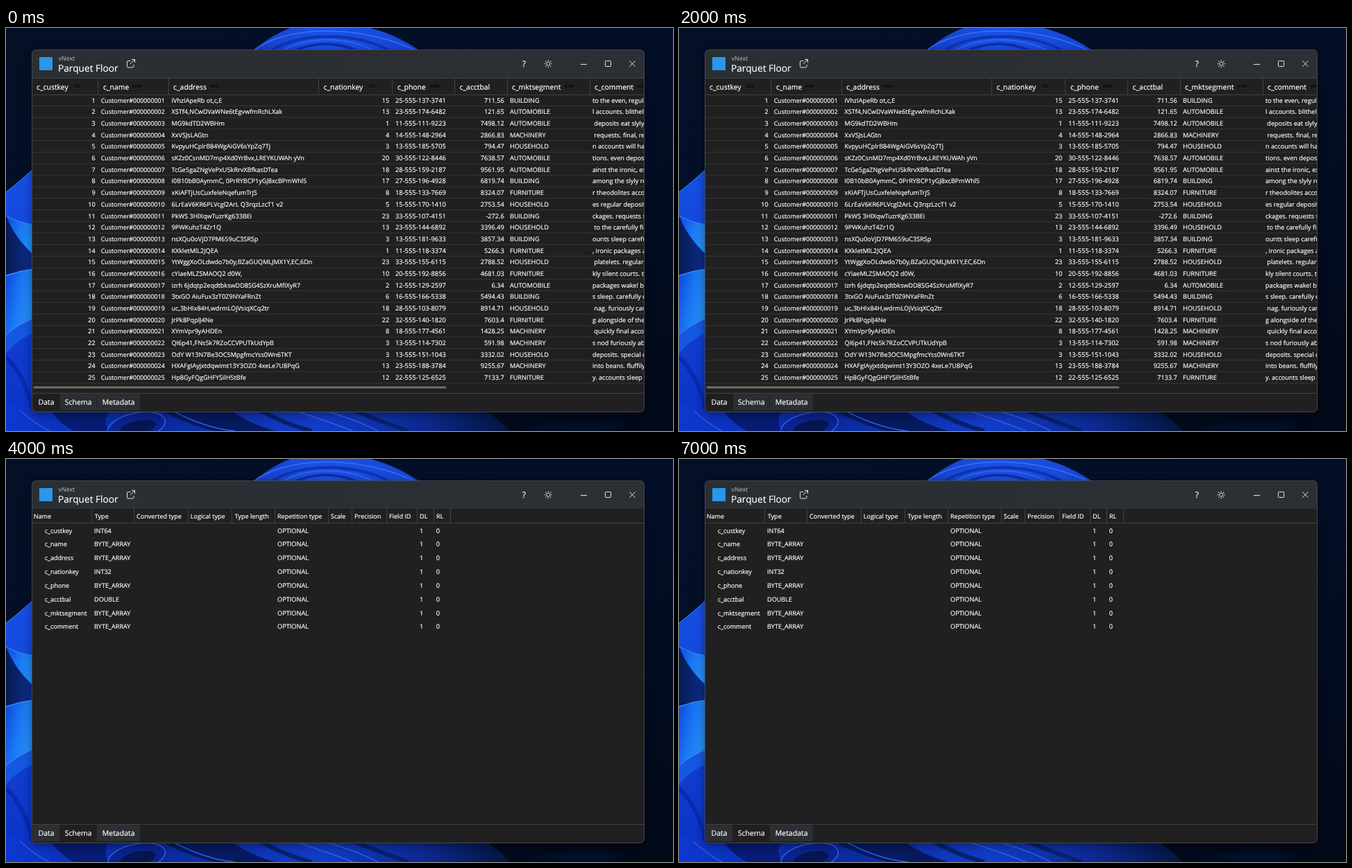
These frames come from a looping animation (961x582 px, 8 s). An HTML page:

```html
<!DOCTYPE html>
<html lang="en">
<head>
<meta charset="utf-8">
<title>Table viewer</title>
<style>
html, body { margin: 0; width: 100%; height: 100%; overflow: hidden; background: #020b1a; }
svg { display: block; width: 961px; height: 582px; }
text { font-family: "Open Sans", "Noto Sans", sans-serif; fill: #fff; stroke: #fff; stroke-width: .18; white-space: pre; text-rendering: geometricPrecision; }
.end { text-anchor: end; }
.mid { text-anchor: middle; }
.badge { font-family: "Liberation Sans", sans-serif; font-weight: bold; fill: #060606; stroke: none; }
.dim { fill: #bfc2c5; stroke: none; }
.icon { fill: none; stroke: #e4e5e6; stroke-width: 1; }
.rule { stroke: #363636; stroke-width: 1; fill: none; }
.edge { stroke: #404244; stroke-width: 1; fill: none; }
#data { animation: first 8s step-end infinite; }
#schema { animation: second 8s step-end infinite; }
@keyframes first { 0% { visibility: visible; } 50%, 100% { visibility: hidden; } }
@keyframes second { 0% { visibility: hidden; } 50%, 100% { visibility: visible; } }
</style>
</head>
<body>
<svg viewBox="0 0 961 582">
  <defs>
    <linearGradient id="sky" x1="0" y1="0" x2="1" y2="1">
      <stop offset="0" stop-color="#031026"/><stop offset=".5" stop-color="#030f28"/><stop offset="1" stop-color="#020917"/>
    </linearGradient>
    <linearGradient id="arch" x1="0" x2="1">
      <stop offset="0" stop-color="#163fc6"/><stop offset=".4" stop-color="#1c50e6"/><stop offset="1" stop-color="#1745d2"/>
    </linearGradient>
    <linearGradient id="petal" x1="0" x2="1" y2=".5">
      <stop offset="0" stop-color="#0c48dc"/><stop offset=".55" stop-color="#1b78f4"/><stop offset="1" stop-color="#2690f8"/>
    </linearGradient>
    <linearGradient id="deep" x1="0" y1="0" x2="0" y2="1">
      <stop offset="0" stop-color="#174fe4"/><stop offset="1" stop-color="#0b32c4"/>
    </linearGradient>
    <linearGradient id="hollow" x1="0" x2="1">
      <stop offset="0" stop-color="#071a52"/><stop offset="1" stop-color="#0c2f90"/>
    </linearGradient>
    <linearGradient id="base" x1="0" x2="1">
      <stop offset="0" stop-color="#0d38d0"/><stop offset=".3" stop-color="#0a2a9c"/>
      <stop offset=".62" stop-color="#123cc8"/><stop offset=".82" stop-color="#0c2a94"/><stop offset="1" stop-color="#05143c"/>
    </linearGradient>
    <linearGradient id="bar" x1="0" x2="1">
      <stop offset="0" stop-color="#2a2f34"/><stop offset="1" stop-color="#2c2f33"/>
    </linearGradient>
    <filter id="blur" x="-10%" y="-10%" width="120%" height="120%"><feGaussianBlur stdDeviation="7"/></filter>
    <clipPath id="frame"><rect x="37" y="31" width="882.5" height="523.5" rx="6"/></clipPath>
  </defs>

  <g id="wallpaper">
    <rect width="961" height="582" fill="url(#sky)"/>
    <path d="M355 34C374 17 394 5 418-3H512C546 4 574 17 598 34Z" fill="url(#arch)"/>
    <g fill="none">
      <path d="M357 32C400-1 500-9 592 33" stroke="#3b78ff" stroke-width="1.2"/>
      <path d="M380 34C420 6 500 4 556 34" stroke="#0f34b0" stroke-width="4"/>
      <path d="M396 34C430 12 490 11 534 34" stroke="#2e6cff" stroke-width="1.5"/>
      <path d="M414 34C442 20 476 19 508 34" stroke="#0d2fa6" stroke-width="4"/>
    </g>
    <path d="M0 237Q17 224 40 203V582H0Z" fill="url(#deep)"/>
    <path d="M0 271Q20 282 40 284V328Q14 304 0 271Z" fill="url(#petal)"/>
    <path d="M0 271Q14 306 40 328V347L0 356Z" fill="url(#hollow)"/>
    <path d="M0 358Q20 350 40 348V418Q16 428 0 442Z" fill="url(#petal)"/>
    <path d="M0 443Q16 428 40 419V440Q14 452 0 470Z" fill="#1558e2"/>
    <g fill="none">
      <path d="M0 237Q17 224 40 203M0 271Q20 282 40 284" stroke="#3c8ffa"/>
      <path d="M0 358Q20 350 40 348M0 443Q16 428 40 419" stroke="#46a4fc"/>
      <path d="M0 476Q28 500 40 560" stroke="#0a2aae" stroke-width="6"/>
    </g>
    <path d="M36 552H690Q712 566 726 582H0V540Z" fill="url(#base)"/>
    <path d="M64 552Q76 571 98 582H148Q138 565 150 552Z" fill="#071c74"/>
    <path d="M222 552Q264 574 300 582H388Q350 571 324 552Z" fill="#071a60"/>
    <ellipse cx="188" cy="575" rx="42" ry="19" fill="#0a2390" stroke="#2a62ea" stroke-width="1.5" transform="rotate(-12 188 575)"/>
    <ellipse cx="190" cy="577" rx="26" ry="10" fill="#061650" transform="rotate(-12 190 577)"/>
    <g fill="none">
      <path d="M20 552Q42 572 62 582M238 552Q290 579 330 582" stroke="#285fe6" stroke-width="1.5"/>
      <path d="M366 552Q404 573 440 582M500 552Q540 568 580 582" stroke="#08206e" stroke-width="6"/>
      <path d="M414 552Q464 568 500 582M456 552Q506 566 536 582" stroke="#2c62ec" stroke-width="1.4"/>
    </g>
    <path d="M740 582Q800 566 900 568L860 582Z" fill="#051a48" opacity=".5" filter="url(#blur)"/>
  </g>

  <rect x="37" y="35" width="883" height="524" rx="6" fill="#000" opacity=".4" filter="url(#blur)"/>
  <g clip-path="url(#frame)">
    <rect x="37" y="31" width="883" height="524" fill="#202020"/>
    <rect x="37" y="31" width="883" height="41" fill="url(#bar)"/>
    <rect x="48" y="42" width="19" height="19" fill="#2b96ea"/>
    <g id="title"></g>
    <g class="icon">
      <path d="M179.5 47.5H176q-1.5 0-1.5 1.5v6.5q0 1.5 1.5 1.5h6.5q1.5 0 1.5-1.5V53M181 45.5h4.5V50M185.5 45.5L179 52"/>
      <circle cx="781.3" cy="51.7" r="2.6"/>
      <g id="rays"></g>
      <path d="M828 52.5H837M898.3 47.5L906.5 55.7M906.5 47.5L898.3 55.7"/>
      <rect x="863.5" y="47.5" width="8" height="8" rx=".7"/>
    </g>
    <g id="data"></g>
    <g id="schema"></g>
    <path class="edge" d="M37 527.5H919"/>
  </g>
  <rect x="37.5" y="31.5" width="882" height="523" rx="6" fill="none" stroke="#44484c"/>
</svg>
<script>
const $ = id => document.getElementById(id);
const text = (x, y, size, str, cls = "") =>
  `<text x="${x}" y="${y.toFixed(2)}" font-size="${size}" class="${cls}">${str}</text>`;
const line = (x1, y1, x2, y2, cls) => `<path class="${cls}" d="M${x1} ${y1}L${x2} ${y2}"/>`;

$("title").innerHTML =
  text(75.5, 47, 8.9, "vNext", "dim") +
  text(75, 62.8, 13.7, "Parquet Floor") +
  text(746.3, 56, 12, "?", "mid");

$("rays").innerHTML = Array.from({ length: 8 }, (_, i) =>
  `<path d="M781.3 47.7V46" transform="rotate(${i * 45} 781.3 51.7)"/>`).join("");

// address | nation | balance | segment | comment
const records = `IVhzIApeRb ot,c,E|15|711.56|B|to the even, regular
XSTf4,NCwDVaWNe6tEgvwfmRchLXak|13|121.65|A|l accounts. blithely
MG9kdTD2WBHm|1|7498.12|A| deposits eat slyly
XxVSJsLAGtn|4|2866.83|M| requests. final, reg
KvpyuHCplrB84WgAiGV6sYpZq7Tj|3|794.47|H|n accounts will have
sKZz0CsnMD7mp4Xd0YrBvx,LREYKUWAh yVn|20|7638.57|A|tions. even deposits
TcGe5gaZNgVePxU5kRrvXBfkasDTea|18|9561.95|A|ainst the ironic, exp
I0B10bB0AymmC, 0PrRYBCP1yGJ8xcBPmWhl5|17|6819.74|B|among the slyly reg
xKiAFTjUsCuxfeleNqefumTrjS|8|8324.07|F|r theodolites accord
6LrEaV6KR6PLVcgl2ArL Q3rqzLzcT1 v2|5|2753.54|H|es regular deposits
PkWS 3HlXqwTuzrKg633BEi|23|-272.6|B|ckages. requests sl
9PWKuhzT4Zr1Q|13|3396.49|H| to the carefully final
nsXQu0oVjD7PM659uC3SRSp|3|3857.34|B|ounts sleep carefully
KXkletMlL2JQEA|1|5266.3|F|, ironic packages ac
YtWggXoOLdwdo7b0y,BZaGUQMLJMX1Y,EC,6Dn|23|2788.52|H| platelets. regular de
cYiaeMLZSMAOQ2 d0W,|10|4681.03|F|kly silent courts. the
izrh 6jdqtp2eqdtbkswDD8SG4SzXruMfIXyR7|2|6.34|A|packages wake! blith
3txGO AiuFux3zT0Z9NYaFRnZt|6|5494.43|B|s sleep. carefully ev
uc,3bHIx84H,wdrmLOjVsiqXCq2tr|18|8914.71|H| nag. furiously caref
JrPk8PqplJ4Ne|22|7603.4|F|g alongside of the sp
XYmVpr9yAHDEn|8|1428.25|M| quickly final accoun
QI6p41,FNs5k7RZoCCVPUTkUdYpB|3|591.98|M|s nod furiously above
OdY W13N7Be3OC5MpgfmcYss0Wn6TKT|3|3332.02|H|deposits. special de
HXAFgIAyjxtdqwimt13Y3OZO 4xeLe7U8PqG|13|9255.67|M|into beans. fluffily fi
Hp8GyFQgGHFYSilH5tBfe|12|7133.7|F|y. accounts sleep ru`.split("\n");

const segments = { A: "AUTOMOBILE", B: "BUILDING", F: "FURNITURE", H: "HOUSEHOLD", M: "MACHINERY" };
const phone = (nation, i) =>
  `${+nation + 10}-555-${100 + i * 37 % 100}-${1000 + i * 2741 % 9000}`;

const dataRow = (record, i) => {
  const [address, nation, balance, segment, comment] = record.split("|");
  const y = 107.6 + i * 16.69;
  const bottom = (112.5 + i * 16.69).toFixed(2);
  return line(37, bottom, 919, bottom, "rule") +
    text(128.7, y, 9.1, i + 1, "end") +
    text(136.7, y, 8.9, "Customer#" + String(i + 1).padStart(9, "0")) +
    text(238.5, y, 9.1, address) +
    text(552.3, y, 9.2, nation, "end") +
    text(561, y, 9.3, phone(nation, i + 1)) +
    text(717.8, y, 9.2, balance, "end") +
    text(726, y, 9.15, segments[segment]) +
    text(845, y, 9.1, comment);
};

// label, text x, column edge, badge, badge x
const dataHeads = [
  ["c_custkey", 44, 132.5, "123", 97], ["c_name", 140, 234.5, "RAW", 182],
  ["c_address", 241, 450.5, "RAW", 294], ["c_nationkey", 457.5, 556.5, "123", 522],
  ["c_phone", 564, 646.5, "RAW", 611], ["c_acctbal", 653.5, 722.5, "", 0],
  ["c_mktsegment", 729, 841.5, "RAW", 805], ["c_comment", 848, 0, "RAW", 910]
];

const tab = (label, x, left, right, active) =>
  `<rect x="${left}" y="528" width="${right - left}" height="24" fill="${active ? "#1f1f1f" : "#2b2f33"}"/>` +
  text(x, 544.3, 10.55, label);
const tabBar = active =>
  tab("Data", 46.5, 39, 77, active === 0) +
  tab("Schema", 84.7, 78, 130, active === 1) +
  tab("Metadata", 138.7, 131, 193, active === 2);

$("data").innerHTML =
  line(37, 72.5, 919, 72.5, "edge") +
  dataHeads.map(([label, x, edge, badge, bx]) =>
    text(x, 88.7, 10.4, label) +
    (badge && text(bx, 86.3, badge === "RAW" ? 5.6 : 6, badge, "badge")) +
    (edge ? line(edge, 73, edge, 96, "edge") : "")).join("") +
  line(37, 96.5, 919, 96.5, "edge") +
  records.map(dataRow).join("") +
  `<rect x="39.5" y="517.5" width="595" height="3" rx="1.5" fill="#707070"/>` +
  tabBar(0);

// label, text x, column edge
const schemaHeads = [
  ["Name", 39.7, 123.5], ["Type", 127.7, 184.5], ["Converted type", 188, 262.5],
  ["Logical type", 265.7, 325.5], ["Type length", 329.5, 387.5], ["Repetition type", 391, 464.5],
  ["Scale", 467.7, 498.5], ["Precision", 502, 548.5], ["Field ID", 552, 592.5],
  ["DL", 596, 616.5], ["RL", 620, 640.5]
];
const fields = ["c_custkey INT64", "c_name BYTE_ARRAY", "c_address BYTE_ARRAY", "c_nationkey INT32",
  "c_phone BYTE_ARRAY", "c_acctbal DOUBLE", "c_mktsegment BYTE_ARRAY", "c_comment BYTE_ARRAY"];

$("schema").innerHTML =
  schemaHeads.map(([label, x, edge]) =>
    text(x, 86, 9.1, label) + line(edge, 72, edge, 92, "edge")).join("") +
  line(37, 92.5, 919, 92.5, "edge") +
  fields.map((field, i) => {
    const [name, type] = field.split(" ");
    const y = 106.5 + i * 19.85;
    return text(55.7, y, 9, name) + text(127, y, 9.1, type) +
      text(391, y, 9.2, "OPTIONAL") + text(596, y, 9.1, 1) + text(619.7, y, 9.1, 0);
  }).join("") +
  tabBar(1);
</script>
</body>
</html>
```
